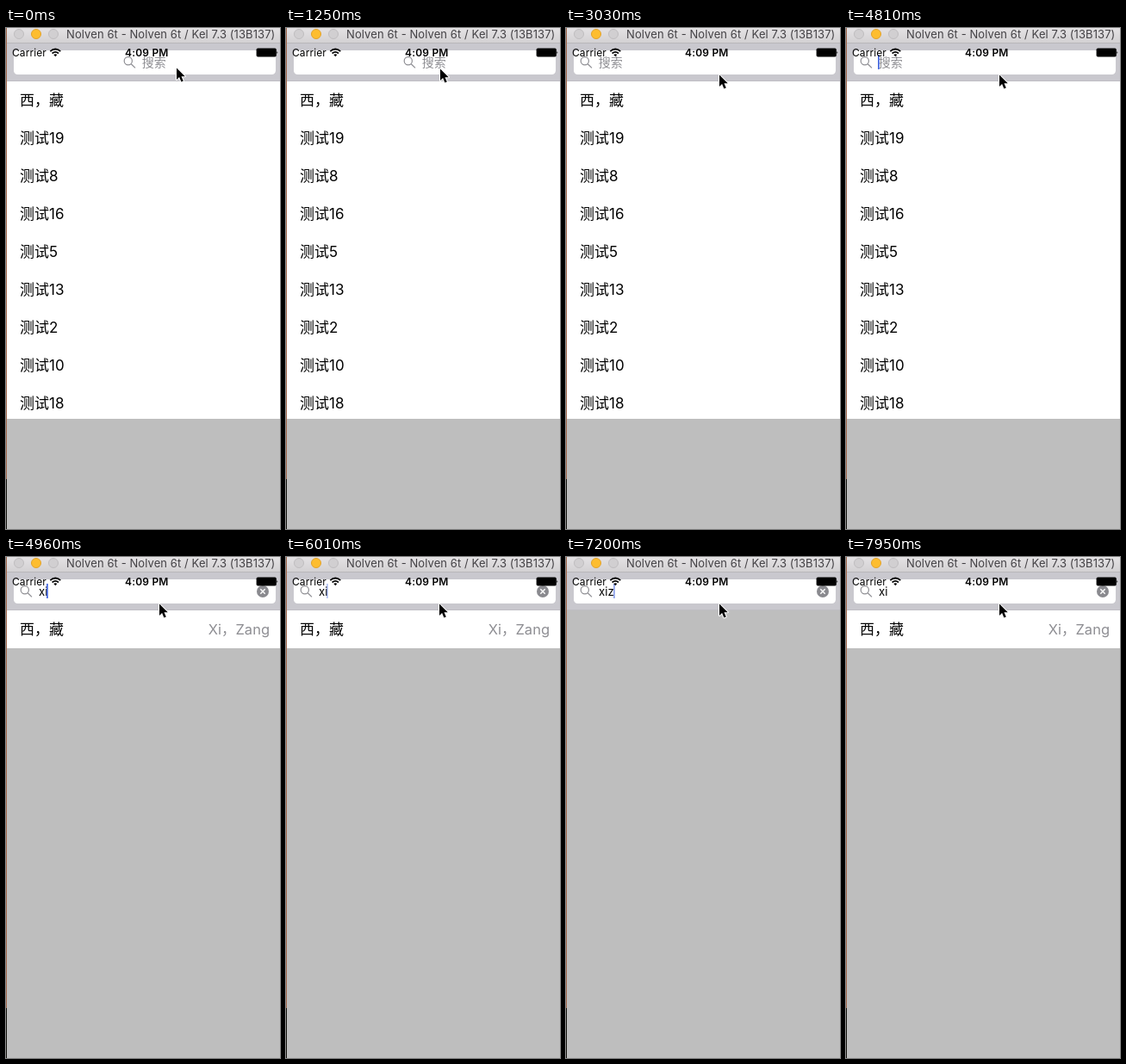
These frames come from a looping animation (318x582 px, 8000 ms). An HTML page:

```html
<!DOCTYPE html>
<html lang="zh-CN">
<head>
<meta charset="utf-8">
<title>搜索</title>
<style>
html, body { margin: 0; width: 100%; height: 100%; overflow: hidden; background: #bebebe; }
svg { display: block; width: 318px; height: 582px; }
text { font-family: Inter, "Noto Sans CJK SC", "Noto Sans CJK", sans-serif; white-space: pre; }
.title { font-size: 13px; fill: #434145; letter-spacing: .09px; }
.status { font-size: 12px; }
.row { font-size: 17px; }
.detail { font-size: 16.5px; fill: #8e8e93; text-anchor: end; }
.hint { font-size: 14px; fill: #8e8e93; }
.typed { font-size: 13.2px; }

/* One shared 8 s clock; every change is a hard step. */
.anim { animation: 8s step-end infinite; }
.cursor { animation-name: cursor; }
.search { animation-name: slide; }
.before { animation-name: before; }
.after { animation-name: after; }
.match { animation-name: match; }
.z { animation-name: z; }
.caret { animation-name: caret-x, caret-blink; animation-duration: 8s; }

@keyframes cursor {
  0% { transform: translate(197px, 46px); }
  2.5% { transform: translate(179px, 46px); }
  15.625% { transform: translate(178px, 47px); }
  17.5% { transform: translate(177px, 48px); }
  19.25% { transform: translate(176px, 49px); }
  30.5% { transform: translate(177px, 47px); }
  34.125% { transform: translate(177px, 50px); }
  36% { transform: translate(177px, 53px); }
  37.875%, 100% { transform: translate(177px, 54px); }
}
@keyframes slide {
  0% { transform: translateX(120px); }
  34.125% { transform: translateX(90px); }
  36% { transform: translateX(20px); }
  37.875%, 100% { transform: translateX(0); }
}
@keyframes before { 0% { opacity: 1; } 62%, 100% { opacity: 0; } }
@keyframes after { 0% { opacity: 0; } 62%, 100% { opacity: 1; } }
@keyframes match {
  0% { opacity: 0; }
  62% { opacity: 1; }
  77% { opacity: 0; }
  91.875%, 100% { opacity: 1; }
}
@keyframes z {
  0% { fill-opacity: 0; }
  77% { fill-opacity: 1; }
  91.875%, 100% { fill-opacity: 0; }
}
@keyframes caret-x {
  0% { transform: translateX(37px); }
  62% { transform: translateX(47px); }
  77% { transform: translateX(55px); }
  91.875%, 100% { transform: translateX(47px); }
}
@keyframes caret-blink {
  0% { opacity: 0; }
  47.125% { opacity: 1; }
  54.625% { opacity: .5; }
  56.5% { opacity: 0; }
  60.125% { opacity: 1; }
  69.5% { opacity: .5; }
  71.375% { opacity: 0; }
  75.125% { opacity: .4; }
  77% { opacity: 1; }
  82.625% { opacity: .6; }
  84.5% { opacity: .3; }
  86.25% { opacity: 0; }
  90% { opacity: .6; }
  91.875% { opacity: 1; }
  95.625% { opacity: .6; }
  97.5% { opacity: .3; }
  99.375%, 100% { opacity: 0; }
}
</style>
</head>
<body>
<svg viewBox="0 0 318 582">
  <defs>
    <linearGradient id="chrome" x2="0" y2="1">
      <stop stop-color="#e4e2e4"/>
      <stop offset="1" stop-color="#d2d0d2"/>
    </linearGradient>
  </defs>

  <rect width="318" height="582" fill="#bebebe"/>

  <!-- Results -->
  <g class="anim before">
    <rect x="1" y="62" width="317" height="392" fill="#fff"/>
    <g class="row">
      <text x="16" y="90">西，藏</text>
      <text x="16" y="134">测试19</text>
      <text x="16" y="178">测试8</text>
      <text x="16" y="222">测试16</text>
      <text x="16" y="266">测试5</text>
      <text x="16" y="310">测试13</text>
      <text x="16" y="354">测试2</text>
      <text x="16" y="398">测试10</text>
      <text x="16" y="442">测试18</text>
    </g>
  </g>
  <g class="anim match">
    <rect x="1" y="62" width="317" height="44" fill="#fff"/>
    <text class="row" x="16" y="90">西，藏</text>
    <text class="detail" x="306" y="90">Xi，Zang</text>
  </g>

  <!-- Search bar -->
  <rect x="1" y="18" width="317" height="44" fill="#c9c8ce"/>
  <rect x="1" y="61" width="317" height="1" fill="#bfbec3"/>
  <rect x="9" y="26" width="304" height="28" rx="4.5" fill="#fff"/>
  <g class="anim search">
    <g fill="none" stroke="#8e8e93" stroke-width="1.2">
      <circle cx="21.8" cy="38.3" r="4.6"/>
      <path d="M25.2 41.7L30 46.4"/>
    </g>
    <text class="hint anim before" x="37.7" y="45">搜索</text>
  </g>
  <g class="anim after">
    <text class="typed" x="38" y="44.5">xi<tspan class="anim z">z</tspan></text>
    <circle cx="298" cy="40" r="7" fill="#8a8a8f"/>
    <path d="M295.3 37.3l5.4 5.4m0-5.4l-5.4 5.4" stroke="#fff" stroke-width="1.4"/>
  </g>
  <rect class="anim caret" y="31" width="1.8" height="17" fill="#4a6be0"/>

  <!-- Status bar -->
  <g class="status">
    <text x="7" y="32.5" letter-spacing=".1">Carrier</text>
    <text x="163.3" y="32.5" text-anchor="middle" font-weight="600" letter-spacing=".2">4:09 PM</text>
  </g>
  <g fill="none" stroke="#000" stroke-width="1.7">
    <path d="M51.3 27.2Q57.3 21.8 63.3 27.2"/>
    <path d="M53.6 29.5Q57.3 26.2 61 29.5"/>
  </g>
  <path d="M57.3 33.2l-2-2.2q2-1.6 4 0z"/>
  <rect x="290.6" y="23.5" width="23.2" height="10" rx="1.7"/>
  <path d="M314.4 27q1.8 1.5 0 3z"/>

  <!-- Window chrome -->
  <rect width="318" height="18" fill="url(#chrome)"/>
  <rect y="17" width="318" height="1" fill="#b9b7ba"/>
  <g stroke-width="1">
    <circle cx="15" cy="7" r="5.5" fill="#d1cfd1" stroke="#bfbdbf"/>
    <circle cx="35" cy="7" r="5.5" fill="#fdbd2f" stroke="#e2a32c"/>
    <circle cx="55" cy="7" r="5.5" fill="#d1cfd1" stroke="#bfbdbf"/>
  </g>
  <text class="title" x="70" y="12">Nolven 6t - Nolven 6t / Kel 7.3 (13B137)</text>
  <rect width="1" height="524" fill="#a2694f"/>
  <rect y="524" width="1" height="58" fill="#15130f"/>

  <path class="anim cursor" d="M1 .6V14L4.1 11.1L6.4 16.5L8.8 15.5L6.5 10.2H10.8z"
        stroke="#fff" stroke-width="2" stroke-linejoin="round" paint-order="stroke"/>
</svg>
</body>
</html>
```
